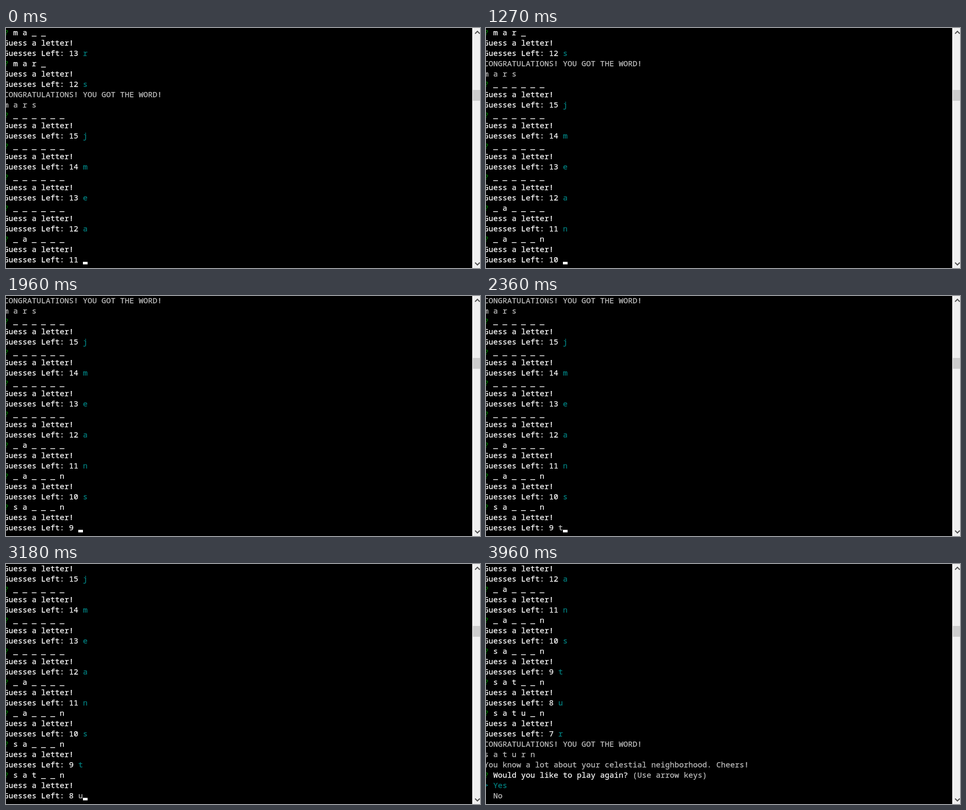
An HTML page that plays this animation: 918 px wide and 465 px high, repeating every 8 s.

```html
<!DOCTYPE html>
<html lang="en">
<head>
<meta charset="utf-8">
<title>Word game in a terminal</title>
<style>
  html, body { margin: 0; width: 100%; height: 100%; overflow: hidden; background: #000; }
  svg { display: block; width: 918px; height: 465px; }
  text { font: 15px "Noto Sans Mono", "DejaVu Sans Mono", monospace; white-space: pre; }
  tspan { fill: currentColor; stroke: currentColor; stroke-width: .25; }
  .white { color: #fff; }
  .grey { color: #c0c0c0; }
  .green { color: #008000; }
  .cyan { color: #008080; }
  .arrow { fill: none; stroke: #505050; stroke-width: 2; }
</style>
</head>
<body>
<svg viewBox="0 0 918 465">
  <rect width="918" height="465"/>
  <g id="screen"></g>
  <rect id="cursor" width="9" height="5" fill="#fff"/>
  <rect x="903" width="15" height="465" fill="#fff"/>
  <rect x="904" width="14" height="465" fill="#f0f0f0"/>
  <rect x="904" y="120" width="14" height="21" fill="#cdcdcd"/>
  <path class="arrow" d="M908.5 11 l4.5 -4.5 l4.5 4.5 M908.5 454.5 l4.5 4.5 l4.5 -4.5"/>
</svg>
<script>
const LOOP = 8000, ROWS = 23, COL = 9, ROW = 20, LEFT = -4;
const BLINK = 522, BLINK_START = 226;
const screenEl = document.getElementById('screen');
const cursorEl = document.getElementById('cursor');

// The player's last letters: when each is typed and when it is answered.
const keys = [[470, 610], [1890, 1960], [2360, 2460], [3180, 3240], [3860, 3960]];

const span = (color, str) => ({ color, str });
const spaced = word => [...word].join(' ');
const mask = (word, known) => [...word].map(c => known.includes(c) ? c : '_').join('');

// Plays a word: every guess uses up one try and reveals its letter.
function play(word, known, left, guesses) {
  return [...guesses].map((letter, i) => ({
    letter,
    left: left - i,
    shown: mask(word, known + guesses.slice(0, i))
  }));
}

const prompt = ({ shown, left }, answer) => [
  [span('green', '? '), span('white', spaced(shown))],
  [span('white', 'Guess a letter!')],
  [span('white', `Guesses Left: ${left} `), answer]
];
const answered = round => prompt(round, span('cyan', round.letter));
const win = word => [
  [span('grey', 'CONGRATULATIONS! YOU GOT THE WORD!')],
  [span('grey', spaced(word))]
];
const menu = [
  [span('grey', 'You know a lot about your celestial neighborhood. Cheers!')],
  [span('green', '? '), span('white', 'Would you like to play again? '), span('grey', '(Use arrow keys)')],
  [span('cyan', '> Yes')],
  [span('grey', '  No')]
];

const firstGame = [...play('mars', 'ma', 13, 'rs').flatMap(answered), ...win('mars')];
const rounds = play('saturn', '', 15, 'jmeanstur');

function stateAt(t) {
  const done = keys.filter(([, enter]) => enter <= t).length;
  const over = done === keys.length;
  const typed = !over && keys[done][0] <= t;
  const wiped = typed && done === keys.length - 1;   // the last prompt is cleared before the result
  const lastEvent = Math.max(0, ...keys.flat().filter(k => k <= t));
  const ticks = time => Math.floor((time - BLINK_START) / BLINK);
  const lit = !over && (ticks(t) - ticks(lastEvent)) % 2 === 0;   // activity relights the cursor
  return { round: rounds.length - keys.length + done, over, typed, wiped, lit };
}

function buildLines({ round, over, typed, wiped }) {
  const lines = [...firstGame, ...rounds.slice(0, round).flatMap(answered)];
  if (over) lines.push(...win('saturn'), ...menu);
  else if (wiped) lines.push([], [], []);
  else lines.push(...prompt(rounds[round], span('grey', typed ? rounds[round].letter : '')));
  return lines.slice(-ROWS);
}

function draw(state) {
  const lines = buildLines(state);
  screenEl.innerHTML = lines.map((line, i) => {
    const spans = line.map(({ color, str }) =>
      `<tspan class="${color}">${str.replace('>', '&gt;')}</tspan>`).join('');
    return `<text x="${LEFT}" y="${14 + ROW * i}">${spans}</text>`;
  }).join('');

  const row = state.wiped ? ROWS - 3 : ROWS - 1;
  const col = lines[row].reduce((n, { str }) => n + str.length, 0);
  cursorEl.setAttribute('x', LEFT + COL * col);
  cursorEl.setAttribute('y', 13 + ROW * row);
  cursorEl.style.display = state.lit ? '' : 'none';
}

let drawn;
function tick(now) {
  const state = stateAt(now % LOOP);
  const id = JSON.stringify(state);
  if (id !== drawn) {
    draw(state);
    drawn = id;
  }
  requestAnimationFrame(tick);
}
draw(stateAt(0));
requestAnimationFrame(tick);
</script>
</body>
</html>
```
